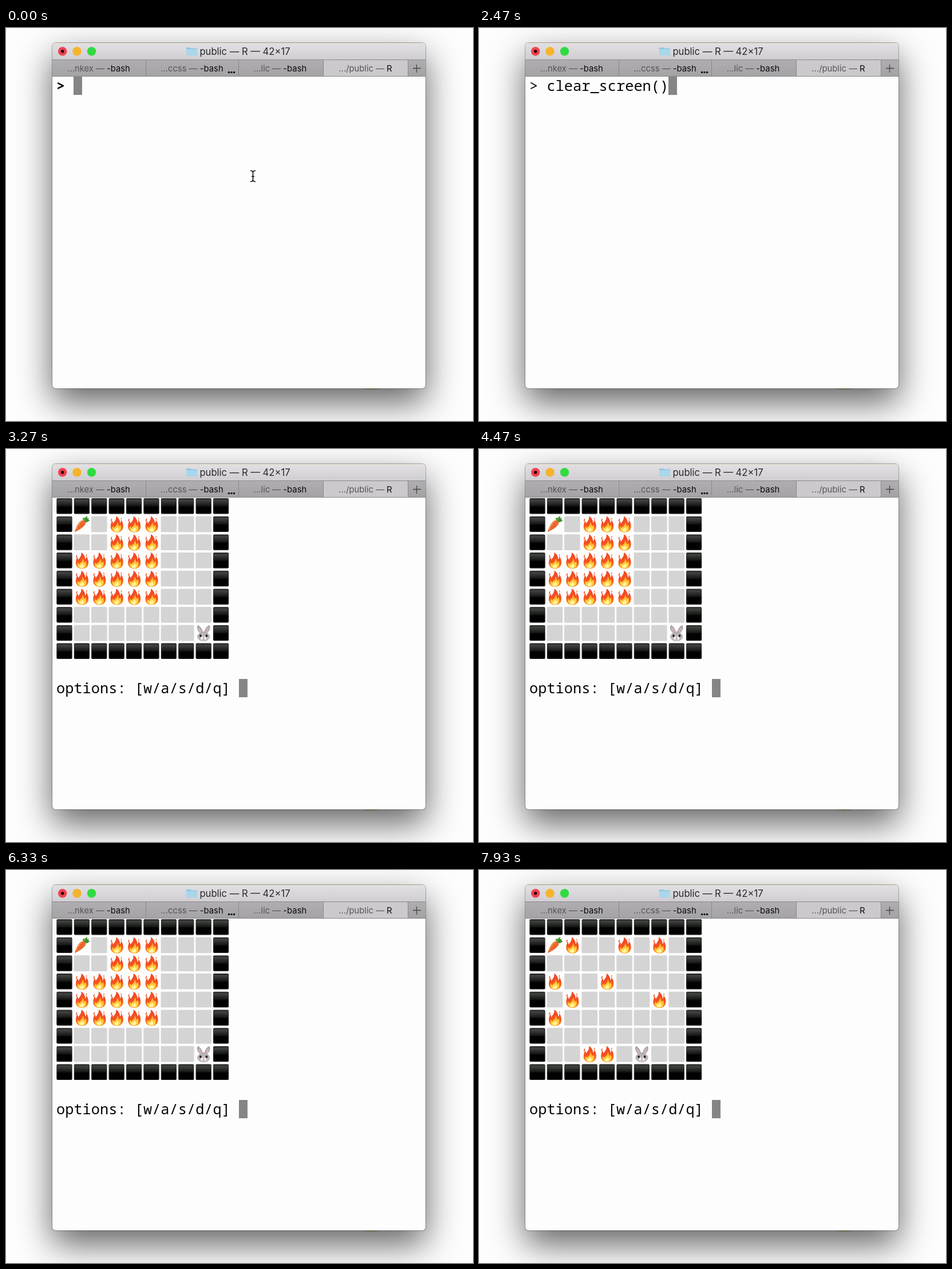
Recreate the animation shown at these times as an HTML page. Size 816 by 687 pixels, loop 8 s.

```html
<!DOCTYPE html>
<html lang="en">
<head>
<meta charset="utf-8">
<title>Terminal maze</title>
<style>
  html, body { margin: 0; width: 100%; height: 100%; overflow: hidden; background: #fdfdfd; }
  .stage { position: relative; width: 816px; height: 687px; overflow: hidden; }
  .stage > * { position: absolute; }
  .shadow {
    left: 81px; top: 26px; width: 652px; height: 604px; border-radius: 6px; background: #fdfdfd;
    box-shadow: 0 0 0 1px rgba(0, 0, 0, .28), 0 24px 60px rgba(0, 0, 0, .62);
  }
  svg { left: 0; top: 0; font-family: Inter, sans-serif; }
  .line {
    left: 88px; height: 32px; display: flex; white-space: pre; color: #050505;
    font: 500 25.33px/31px "Noto Sans Mono", monospace;
  }
  .first { top: 85px; }
  .options { top: 402px; }
  .caret { width: 15px; background: #858585; }
  .typed { overflow: hidden; animation: type 8s steps(14) infinite; }
  .gt { animation: weight 8s step-end infinite; }
  .prompt { animation: prompt 8s step-end infinite; }
  .game { animation: game 8s step-end infinite; }
  .level1 { animation: level1 8s step-end infinite; }
  .level2 { animation: level2 8s step-end infinite; }
  .pointer { animation: pointer 8s step-end infinite; }
  @keyframes type { 0%, 3.75% { width: 0; } 15%, 100% { width: 14ch; } }
  @keyframes weight { 0% { font-weight: 700; } 4.5%, 100% { font-weight: 500; } }
  @keyframes pointer { 0% { visibility: visible; } 4.5%, 100% { visibility: hidden; } }
  @keyframes prompt { 0% { visibility: visible; } 35.9%, 100% { visibility: hidden; } }
  @keyframes game { 0% { visibility: hidden; } 35.9%, 100% { visibility: visible; } }
  @keyframes level1 { 0% { visibility: hidden; } 35.9% { visibility: visible; } 89.1%, 100% { visibility: hidden; } }
  @keyframes level2 { 0% { visibility: hidden; } 89.1%, 100% { visibility: visible; } }
</style>
</head>
<body>
<div class="stage">
  <div class="shadow"></div>
  <svg width="816" height="687" viewBox="0 0 816 687">
    <defs>
      <linearGradient id="bar" x2="0" y2="1">
        <stop stop-color="#e3e0e4"/><stop offset="1" stop-color="#d0ced2"/>
      </linearGradient>
      <linearGradient id="tabs" x2="0" y2="1">
        <stop stop-color="#b0aeb1"/><stop offset="1" stop-color="#a4a2a5"/>
      </linearGradient>
      <linearGradient id="gloss" x2="0" y2="1">
        <stop stop-color="#1b1d1b"/><stop offset=".12" stop-color="#414441"/>
        <stop offset=".48" stop-color="#151715"/><stop offset=".55" stop-color="#020202"/>
        <stop offset="1" stop-color="#000"/>
      </linearGradient>
      <linearGradient id="fire" x2="0" y2="1">
        <stop stop-color="#f0482a"/><stop offset=".55" stop-color="#f4501f"/><stop offset="1" stop-color="#fb9a26"/>
      </linearGradient>
      <linearGradient id="glow" x2="0" y2="1">
        <stop stop-color="#fb8a24"/><stop offset=".5" stop-color="#ffc936"/><stop offset="1" stop-color="#ffe45c"/>
      </linearGradient>
      <linearGradient id="fur" x2="0" y2="1">
        <stop stop-color="#aaa5a6"/><stop offset="1" stop-color="#c3bfc1"/>
      </linearGradient>

      <g id="wall">
        <rect x=".4" y=".4" width="27.2" height="27.4" rx="2" fill="url(#gloss)"/>
        <rect x="1.2" y="1.2" width="25.6" height="25.8" rx="1.5" fill="none" stroke="#2b2d2b" stroke-width=".7"/>
      </g>
      <rect id="floor" x=".2" y=".3" width="27.6" height="27.6" rx="1.6" fill="#d4d4d4"/>
      <g id="flame">
        <path fill="url(#fire)" d="M13 0C17 2 20 7 20 12C22 11 22 8 21 6C25 10 26 15 25.500 20C25 25 20 28.500 14.500 28.500C8 28.500 3.500 24.500 3.500 18.500C3.500 14 5 11 6 8C7 9.500 7.500 11 7.800 13C11 9 14 5 13 0Z"/>
        <path fill="#f15a29" d="M5.500 4C7 6 5.600 8 4.300 10C3.300 8 4 6 5.500 4ZM22 2.500C23 4 23.500 5 22.600 6.500C21.400 5.500 21.500 4 22 2.500Z"/>
        <path fill="url(#glow)" d="M15 10C18 13 18 16 18.500 18C20 17 20.500 15.500 20.500 14C23 20 22 27.500 14.500 27.800C8.500 28 5.500 23 7 18C8 19 8.500 20 9 21C12.500 18 15.500 15 15 10Z"/>
        <path fill="#fff6a8" d="M15 19C18 22 18.500 27 14.500 27.200C10.500 27.200 10 24 11.500 22.500C13 23 15 21.500 15 19Z"/>
      </g>
      <g id="carrot">
        <path d="M18 9C18 5 20 1 24 0L23 4L27 3L25 6L28 7C25 11 22 11 18 11Z" fill="#3f8f2e"/>
        <path d="M17 9L15 4L19 2L20 8" fill="#5ba53a"/>
        <path d="M13 8C17 6 22 9 20.500 14C17 20 8 25 1.500 28C3 22 7 12 13 8Z" fill="#ee6a2c"/>
        <path d="M14 9C9 13 6 19 4 24" fill="none" stroke="#fb955a" stroke-width="1.500"/>
        <path d="M11 12L14 14M15 18L12 16.500M7 18L10 20" stroke="#c94b1b" stroke-width=".9"/>
      </g>
      <g id="rabbit">
        <path fill="url(#fur)" stroke="#8c8789" stroke-width=".6" d="M8 14C3 9 2 4 4 1C8 2 11 7 12 12H16C17 7 20 2 24 1C26 4 25 9 20 14C24 17 25.500 20 24 23C22 26.500 19 28 14 28C9 28 6 26.500 4 23C2.500 20 4 17 8 14Z"/>
        <path fill="#d9b6bd" d="M5 4C8 6 9.500 9 10 12L8.500 13C6 10 5 7 5 4ZM23 4C20 6 18.500 9 18 12L19.500 13C22 10 23 7 23 4Z"/>
        <ellipse cx="14" cy="23.500" rx="5" ry="3.800" fill="#f2eff0"/>
        <g fill="#272326"><ellipse cx="8.700" cy="19" rx="1.900" ry="2.200"/><ellipse cx="19.300" cy="19" rx="1.900" ry="2.200"/></g>
        <path d="M12 20.800H16L14 23Z" fill="#d9798b"/>
        <path d="M14 23V25M11.500 25Q14 26.500 16.500 25" fill="none" stroke="#655e61" stroke-width=".7"/>
      </g>
    </defs>

    <path d="M81 55V32a6 6 0 0 1 6-6H727a6 6 0 0 1 6 6V55Z" fill="url(#bar)"/>
    <path d="M86 26.500H728" stroke="#dedbb9"/>
    <circle cx="98.700" cy="40.800" r="7.700" fill="#f0434f"/>
    <circle cx="98.700" cy="40.800" r="2.800" fill="#260306"/>
    <circle cx="124" cy="40.800" r="7.700" fill="#f6b42c"/>
    <circle cx="149.500" cy="40.800" r="7.700" fill="#30db40"/>
    <path d="M315 35a1 1 0 0 1 1-1H322L324 35.500H333a1 1 0 0 1 1 1V47a1 1 0 0 1-1 1H316a1 1 0 0 1-1-1Z" fill="#8fc7e2"/>
    <rect x="315" y="37" width="19" height="11" rx="1" fill="#a9d6ea"/>
    <text x="417.500" y="47" text-anchor="middle" font-size="16.600" fill="#282729">public — R — 42×17</text>

    <rect x="81" y="55" width="652" height="30" fill="url(#tabs)"/>
    <rect x="555" y="55" width="147" height="30" fill="#cbc9cc"/>
    <path d="M81 55.500H733M81 84.500H733M244.500 55V85M406.500 55V85M554.500 55V85M702.500 55V85" stroke="#89878b"/>
    <g id="labels" text-anchor="middle" font-size="14.800" fill="#565457"></g>
    <path d="M711 70.500H725M717.500 64V78" stroke="#464447" stroke-width="1.300"/>
    <path d="M388 77.500H391M392.500 77.500H395.500M397 77.500H400" stroke="#111" stroke-width="3"/>
    <ellipse cx="638" cy="631" rx="14" ry="1.200" fill="#55571f" opacity=".4"/>

    <g class="level1" id="level1"></g>
    <g class="level2" id="level2"></g>
    <g class="pointer" fill="none" stroke-linecap="round">
      <path id="beam" d="M427.500 249.500Q431.500 249.500 431.500 253V265Q431.500 268.500 427.500 268.500M435.500 249.500Q431.500 249.500 431.500 253M431.500 265Q431.500 268.500 435.500 268.500M429.500 259.500H433.500" stroke="#111" stroke-width="1.600"/>
    </g>
  </svg>
  <div class="line first prompt"><span class="gt">&gt; </span><span class="typed">clear_screen()</span><span class="caret"></span></div>
  <div class="line options game"><span>options: [w/a/s/d/q] </span><span class="caret"></span></div>
</div>
<script>
  const levels = {
    level1: ["##########", "#c.fff...#", "#..fff...#", "#fffff...#", "#fffff...#",
             "#fffff...#", "#........#", "#.......r#", "##########"],
    level2: ["##########", "#cf..f.f.#", "#........#", "#f..f....#", "#.f....f.#",
             "#f.......#", "#........#", "#..ff.r..#", "##########"]
  };
  const tiles = { "#": "wall", ".": "floor", f: "flame", c: "carrot", r: "rabbit" };
  const tile = (key, col, row) =>
    `<use href="#${tiles[key]}" x="${88 + 30.4 * col}" y="${85.6 + 31.7 * row}"/>`;

  for (const [id, rows] of Object.entries(levels)) {
    document.getElementById(id).innerHTML =
      rows.map((line, row) => [...line].map((key, col) => tile(key, col, row)).join("")).join("");
  }

  const tabs = [[162, "...nkex", "-bash"], [325, "...ccss", "-bash"], [479, "...lic", "-bash"], [628, ".../public", "R"]];
  document.getElementById("labels").innerHTML = tabs.map(([x, folder, process]) =>
    `<text x="${x}" y="76">${folder} — <tspan fill="#0c0b0c">${process}</tspan></text>`).join("");
</script>
</body>
</html>
```
